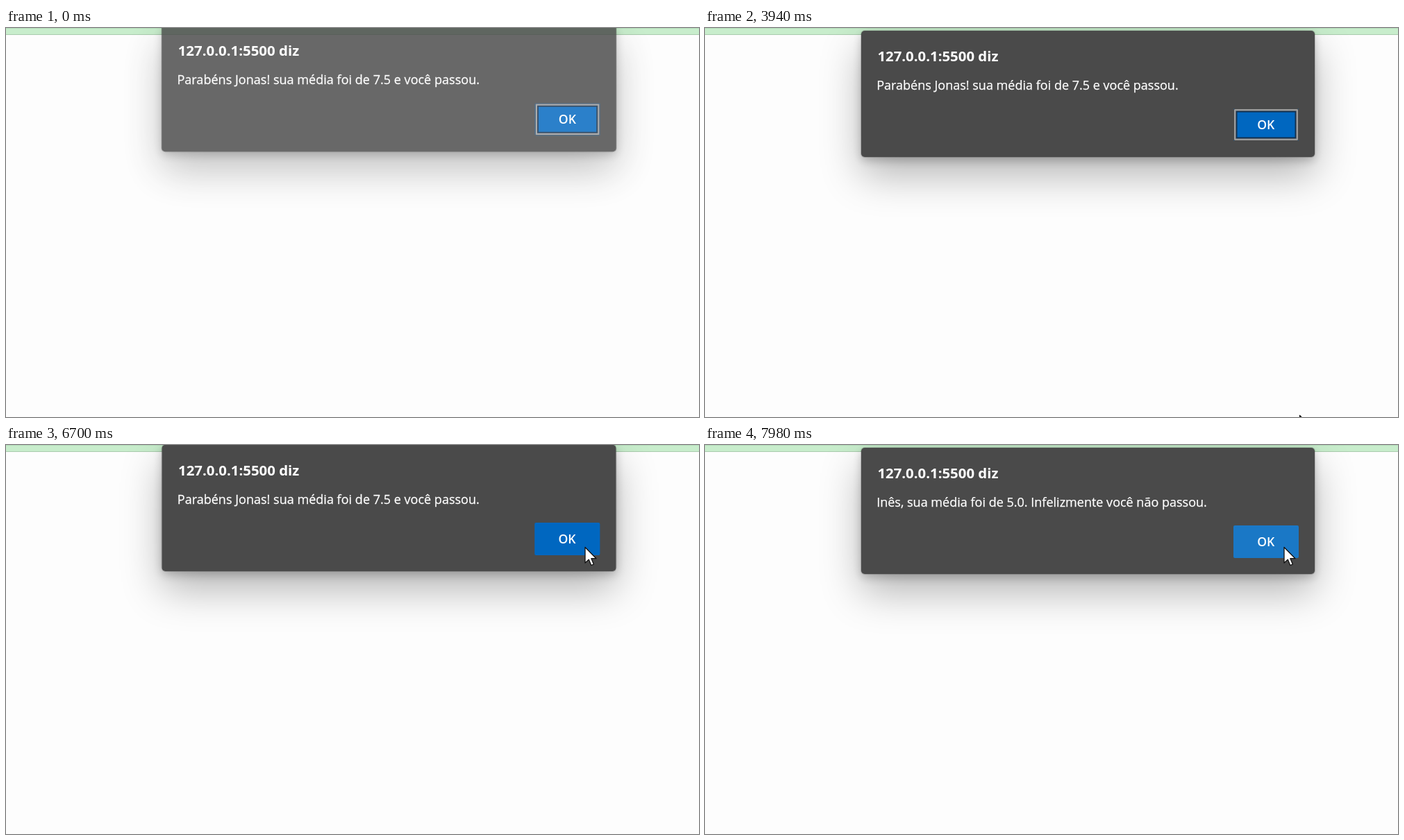
Write an HTML page that moves like this. It is 998 by 561 pixels and loops after 8 s.

```html
<!DOCTYPE html>
<html lang="pt">
<head>
<meta charset="utf-8">
<title>Média</title>
<style>
  html, body { margin: 0; width: 100%; height: 100%; overflow: hidden; }
  body { position: relative; background: #fdfdfd; font: 18px/24px "Open Sans", "Noto Sans", sans-serif; }
  .bar {
    position: absolute; left: 0; right: 0; top: 0; height: 10px; box-sizing: border-box;
    background: #c8edcc; border-top: 1px solid #b4dcb9; border-bottom: 1px solid #a9cbad;
  }
  .dialog {
    position: absolute; left: 224.5px; top: 4px; width: 652.5px; height: 182px;
    border-radius: 5px; background: #4a4a4a; color: #fff;
    box-shadow: 0 0 0 1px rgba(0,0,0,.16), 0 5px 14px rgba(0,0,0,.22), 0 26px 58px rgba(0,0,0,.29);
  }
  .dialog > * { position: absolute; white-space: nowrap; }
  .title { left: 23.4px; top: 24px; font-size: 20.4px; font-weight: 700; }
  .text { left: 22.2px; top: 65.5px; -webkit-text-stroke: .25px #fff; }
  .button {
    left: 536px; top: 112px; width: 93.5px; height: 47px; border-radius: 2px;
    font-size: 17.6px; font-weight: 600; line-height: 46px; text-align: center;
  }
  .ring {
    position: absolute; inset: 0; border: 1px solid #4a4a4a; border-radius: 2px;
    box-shadow: inset 0 0 0 2.5px #9c9c9c, inset 0 0 0 4.5px #14304d;
  }
  .cursor { position: absolute; left: 0; top: 0; width: 20px; height: 30px; overflow: visible; }
</style>
</head>
<body>
<div class="bar"></div>
<div class="dialog" id="pass">
  <div class="title">127.0.0.1:5500 diz</div>
  <div class="text">Parabéns Jonas! sua média foi de 7.5 e você passou.</div>
  <div class="button">OK<div class="ring"></div></div>
</div>
<div class="dialog" id="fail">
  <div class="title">127.0.0.1:5500 diz</div>
  <div class="text">Inês, sua média foi de 5.0. Infelizmente você não passou.</div>
  <div class="button">OK</div>
</div>
<svg class="cursor" viewBox="0 0 20 30">
  <path d="M1 1V23.5L6.2 18.6L9.8 27L13.4 25.4L9.9 17.2H17Z" fill="#fff" stroke="#111" stroke-width="1.3" stroke-linejoin="round"/>
</svg>
<script>
  const LOOP = 8000;
  const MOVE = 3940, HOVER = 5720, PRESS = 6150, CLOSE = 6560, REOPEN = 6873;
  const OPENED = -118; // the first dialog is already opening when the loop starts

  const [pass, fail] = document.querySelectorAll('.dialog');
  const ring = document.querySelector('.ring');
  const cursor = document.querySelector('.cursor');

  // Progress from 0 to 1 of a phase that begins at start.
  const phase = (t, start, length) => Math.min(1, Math.max(0, (t - start) / length));

  function opening(t, start) {
    const p = phase(t, start, 400);
    return { y: -16 * (1 - p) ** 2, opacity: Math.min(1, p / .36) };
  }

  function closing(t, start) {
    const p = phase(t, start, 460);
    return { y: -24 * p ** 1.5, opacity: Math.min(1, 1.7 * (1 - p)) };
  }

  function place(dialog, { y, opacity }) {
    dialog.style.transform = `translateY(${y}px) scale(${1 - y * .0003})`;
    dialog.style.opacity = opacity;
  }

  function tint(dialog, hover) {
    dialog.querySelector('.button').style.background =
      `color-mix(in srgb, #1a78c6 ${hover * 100}%, #0067c0)`;
  }

  function moveCursor(t) {
    const p = phase(t, MOVE, 2060);
    const x = 855.5 - 22.5 * p ** 3 + 14 * Math.sin(Math.PI * p);
    const y = 558 - 411.5 * Math.sin(Math.PI / 2 * p);
    cursor.style.transform = `translate(${x}px, ${y}px)`;
    cursor.style.visibility = t < MOVE ? 'hidden' : 'visible';
  }

  function draw() {
    const t = performance.now() % LOOP;
    place(pass, t < CLOSE ? opening(t, OPENED) : closing(t, CLOSE));
    place(fail, opening(t, REOPEN));
    tint(pass, t < PRESS ? phase(t, HOVER, 120) : 0);
    tint(fail, phase(t, REOPEN + 180, 240));
    ring.style.visibility = t < PRESS ? 'visible' : 'hidden';
    moveCursor(t);
    requestAnimationFrame(draw);
  }
  draw();
</script>
</body>
</html>
```
